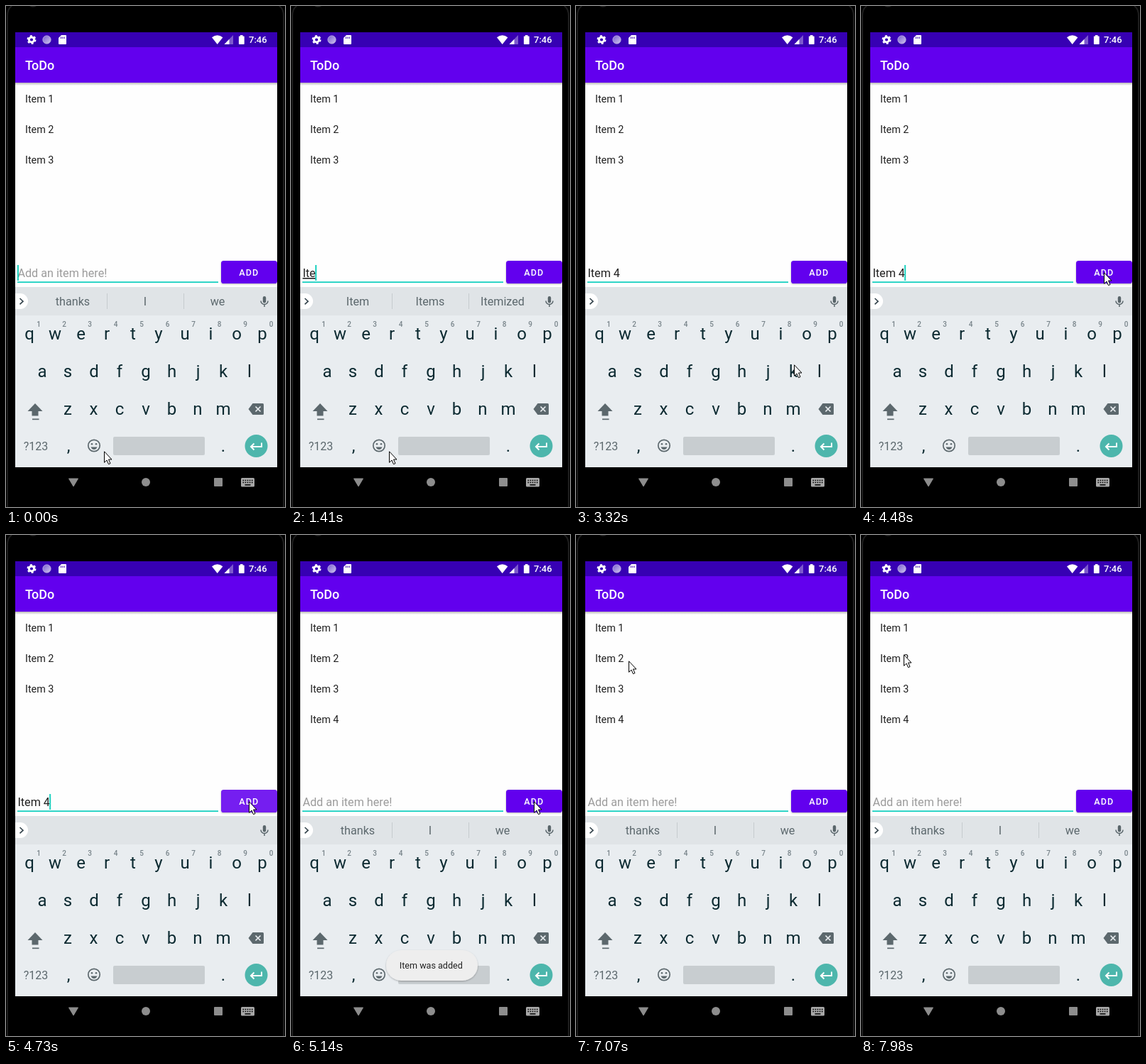
These frames come from a looping animation (393x706 px, 8000 ms). An HTML page:

```html
<!DOCTYPE html>
<html lang="en">
<head>
<meta charset="utf-8">
<title>ToDo</title>
<style>
html, body { margin: 0; width: 100%; height: 100%; overflow: hidden; background: #000; }
svg { display: block; width: 393px; height: 706px; font-family: Roboto, sans-serif; }
.mid { text-anchor: middle; }
.item { font-size: 14.37px; fill: #1f1f1f; }
.field { font-size: 16.16px; fill: #1f1f1f; }
.hint { fill: #9b9b9b; }
.typing { text-decoration: underline; }
.suggest { font-size: 16.16px; fill: #5c686d; text-anchor: middle; }
.keys { font-size: 24px; fill: #0c2a31; text-anchor: middle; }
.digits { font-size: 10px; font-weight: 500; fill: #78848a; text-anchor: middle; }

/* every change is a hard step on one shared 8 s clock */
.anim { animation: 8s step-end -2ms infinite; }
.off { opacity: 0; }

#idle { animation-name: idle; }
#w1 { animation-name: w1; }
#w2 { animation-name: w2; }
#w3 { animation-name: w3; }
#w4 { animation-name: w4; }
#w5 { animation-name: w5; }
#w6 { animation-name: w6; }
#next { animation-name: next; }
#added { animation-name: added; }
#press { animation-name: press; }
#toast { animation-name: toast; }
#caret { animation-name: blink; }
#caretX { animation-name: caretX; }
#mouse { animation-name: mouse; }

@keyframes idle { 0% { opacity: 1 } 13.875% { opacity: 0 } 59.375% { opacity: 1 } }
@keyframes w1 { 13.875% { opacity: 1 } 15.75% { opacity: 0 } }
@keyframes w2 { 15.75% { opacity: 1 } 17.625% { opacity: 0 } }
@keyframes w3 { 17.625% { opacity: 1 } 19.5% { opacity: 0 } }
@keyframes w4 { 19.5% { opacity: 1 } 21.375% { opacity: 0 } }
@keyframes w5 { 21.375% { opacity: 1 } 29.5% { opacity: 0 } }
@keyframes w6 { 29.5% { opacity: 1 } 59.375% { opacity: 0 } }
@keyframes next { 21.375% { opacity: 1 } 31% { opacity: 0 } }
@keyframes added { 59.375%, 100% { opacity: 1 } }
@keyframes press {
  57.5% { opacity: .12 } 59.375% { opacity: .22 } 60.875% { opacity: .15 }
  62.625% { opacity: .07 } 64.25% { opacity: 0 }
}
@keyframes toast {
  60.875% { opacity: .4 } 62.625% { opacity: .8 } 64.25% { opacity: 1 }
  86.75% { opacity: .5 } 88.375% { opacity: 0 }
}
@keyframes blink {
  0%, 10.375%, 43.375%, 56%, 69.125%, 83.25%, 94.75% { opacity: 1 }
  5%, 37.75%, 50.625%, 64.25%, 76%, 88.375%, 99.75% { opacity: 0 }
}
@keyframes caretX {
  0%, 59.375% { transform: translateX(0) }
  13.875% { transform: translateX(4.4px) }
  15.75% { transform: translateX(9.7px) }
  17.625% { transform: translateX(18.2px) }
  19.5% { transform: translateX(32.4px) }
  21.375% { transform: translateX(36.4px) }
  29.5% { transform: translateX(45.2px) }
}
@keyframes mouse {
  0% { transform: translate(138px, 627px) }
  37.75% { transform: translate(160px, 612px) }
  39.625% { transform: translate(236px, 560px) }
  41.5% { transform: translate(307px, 505px) }
  43.375% { transform: translate(348px, 455px) }
  45.25% { transform: translate(370px, 418px) }
  47.125% { transform: translate(371px, 398px) }
  48.75% { transform: translate(361px, 388px) }
  50.625% { transform: translate(353px, 383px) }
  52.5% { transform: translate(342px, 375px) }
  69.125% { transform: translate(325px, 363px) }
  70.875% { transform: translate(278px, 345px) }
  72.625% { transform: translate(225px, 324px) }
  76% { transform: translate(180px, 284px) }
  77.875% { transform: translate(135px, 244px) }
  79.75% { transform: translate(104px, 214px) }
  81.75% { transform: translate(92px, 202px) }
  83.25% { transform: translate(85px, 193px) }
  85% { transform: translate(80px, 186px) }
  86.75% { transform: translate(76px, 180px) }
  88.375% { transform: translate(74px, 177px) }
  89.875% { transform: translate(66px, 172px) }
  91.375%, 100% { transform: translate(60px, 168px) }
}
</style>
</head>
<body>
<svg viewBox="0 0 393 706">
  <defs>
    <linearGradient id="fall" x2="0" y2="1">
      <stop stop-color="#000" stop-opacity=".28"/>
      <stop offset="1" stop-color="#000" stop-opacity="0"/>
    </linearGradient>
    <linearGradient id="spin" x2="1" y2="1">
      <stop stop-color="#7a5fd0"/>
      <stop offset="1" stop-color="#cfc5ee"/>
    </linearGradient>
    <filter id="soft" x="-10%" y="-20%" width="120%" height="150%">
      <feDropShadow dx="0" dy="1" stdDeviation="1.2" flood-opacity=".28"/>
    </filter>
  </defs>

  <!-- phone body -->
  <rect width="393" height="706" fill="#000"/>
  <path d="M2 706V14Q2 4 8 0M391 706V14Q391 4 385 0" fill="none" stroke="#1e1e1e" stroke-width="2"/>
  <path d="M33 0Q38 3 43 0" fill="#262626"/>

  <!-- app -->
  <rect x="13" y="37" width="369" height="613" fill="#fefefe"/>
  <rect x="13" y="108" width="369" height="4" fill="url(#fall)"/>
  <rect x="13" y="58" width="369" height="50" fill="#6200ee"/>
  <rect x="13" y="37" width="369" height="21" fill="#3700b3"/>
  <text x="27" y="90" font-size="17.96" font-weight="500" fill="#fff">ToDo</text>

  <!-- status icons -->
  <g fill="#fff">
    <circle cx="36" cy="47.5" r="3.6" fill="none" stroke="#fff" stroke-width="3"/>
    <circle cx="36" cy="47.5" r="5.5" fill="none" stroke="#fff" stroke-width="2" stroke-dasharray="2.9 2.86"/>
    <circle cx="57.5" cy="47.5" r="5.6" fill="url(#spin)" stroke="#bfb2e6"/>
    <path d="M78 41H84Q85 41 85 42V53Q85 54 84 54H75Q74 54 74 53V45Z"/>
    <path d="M77.5 43.5v2.5M79.8 43.5v2.5M82.1 43.5v2.5" stroke="#3700b3"/>
    <path d="M290 44.3Q297.7 38 305.4 44.3L297.7 54Z"/>
    <path d="M320 41V54H307.5Z" opacity=".35"/>
    <path d="M314.5 46.8V54H307.5Z"/>
    <path d="M330 41h3.5v1.4H335q.7 0 .7.7V53.3q0 .7-.7.7h-6.400q-.7 0-.7-.7V43.100q0-.7.7-.7H330Z"/>
    <text x="342" y="52" font-size="13" font-weight="500">7:46</text>
  </g>

  <!-- list -->
  <g class="item">
    <text x="27" y="135.500">Item 1</text>
    <text x="27" y="178.500">Item 2</text>
    <text x="27" y="221.500">Item 3</text>
    <text x="27" y="264.500" class="anim off" id="added">Item 4</text>
  </g>

  <!-- entry row -->
  <rect x="16" y="388.300" width="283" height="1.800" fill="#14cfc0"/>
  <rect x="303" y="359" width="79" height="32" rx="3.600" fill="#6200ee" filter="url(#soft)"/>
  <rect x="303" y="359" width="79" height="32" rx="3.600" fill="#fff" class="anim off" id="press"/>
  <text x="328.300" y="380" font-size="12.570" font-weight="500" letter-spacing="1.120" fill="#fff">ADD</text>

  <!-- keyboard -->
  <rect x="13" y="396" width="369" height="254" fill="#e9edf0"/>
  <rect x="13" y="396" width="369" height="40" fill="#e0e4e7"/>
  <path d="M13 405H20A11 11 0 0 1 20 427H13Z" fill="#fff"/>
  <path d="M19.500 412L24 416.200L19.500 420.400" fill="none" stroke="#37474f" stroke-width="1.700"/>
  <g stroke="#59656a" stroke-width="1.500" fill="none">
    <rect x="361.800" y="409" width="4.400" height="9.500" rx="2.200" fill="#59656a" stroke="none"/>
    <path d="M359 415.500A5 5 0 0 0 369 415.500M364 420.500V424"/>
  </g>

  <!-- field text with its suggestions -->
  <g class="anim" id="idle">
    <text x="16.400" y="382" class="field hint">Add an item here!</text>
    <g class="suggest"><text x="94" y="422">thanks</text><text x="196" y="422">I</text><text x="298" y="422">we</text></g>
    <path d="M142.500 405V427M250.500 405V427" stroke="#c6cbce"/>
  </g>
  <g class="anim off" id="w1">
    <text x="16.400" y="382" class="field typing">I</text>
    <g class="suggest"><text x="94" y="422">I'm</text><text x="196" y="422">I</text><text x="298" y="422">In</text></g>
    <path d="M142.500 405V427M250.500 405V427" stroke="#c6cbce"/>
  </g>
  <g class="anim off" id="w2">
    <text x="16.400" y="382" class="field typing">It</text>
    <g class="suggest"><text x="94" y="422">Its</text><text x="196" y="422">It</text><text x="298" y="422">It's</text></g>
    <path d="M142.500 405V427M250.500 405V427" stroke="#c6cbce"/>
  </g>
  <g class="anim off" id="w3">
    <text x="16.400" y="382" class="field typing">Ite</text>
    <g class="suggest"><text x="94" y="422">Item</text><text x="196" y="422">Items</text><text x="298" y="422">Itemized</text></g>
    <path d="M142.500 405V427M250.500 405V427" stroke="#c6cbce"/>
  </g>
  <g class="anim off" id="w4">
    <text x="16.400" y="382" class="field typing">Item</text>
    <g class="suggest"><text x="94" y="422">Item</text><text x="196" y="422">Items</text><text x="298" y="422">Itemized</text></g>
    <path d="M142.500 405V427M250.500 405V427" stroke="#c6cbce"/>
  </g>
  <text x="16.400" y="382" class="field anim off" id="w5">Item</text>
  <text x="16.400" y="382" class="field anim off" id="w6">Item 4</text>
  <g class="anim off" id="next">
    <g class="suggest"><text x="94" y="422">is</text><text x="196" y="422">in</text><text x="298" y="422">and</text></g>
    <path d="M142.500 405V427M250.500 405V427" stroke="#c6cbce"/>
  </g>
  <g class="anim" id="caretX">
    <rect x="16" y="365" width="1.800" height="22" fill="#03cdb9" class="anim" id="caret"/>
  </g>

  <!-- keys -->
  <text class="digits" y="452" x="46 82 118 154.500 191 227.500 264 300.500 337 373.500">1234567890</text>
  <g class="keys">
    <text y="470" x="33 69 105.500 142 179 215 252 288.500 325 361">qwertyuiop</text>
    <text y="523" x="51 87 124 160 197 233.500 270.500 306 343">asdfghjkl</text>
    <text y="576" x="87 123.500 160 197 233.500 270 306">zxcvbnm</text>
    <text y="628" x="88 306">,.</text>
  </g>
  <g fill="#5c686d">
    <path d="M41 560L51.500 571H45.500V577.500H36.500V571H30.500Z"/>
    <rect x="37" y="581.500" width="9.500" height="1.700"/>
    <path d="M347.500 560H361.500Q363 560 363 561.500V574.500Q363 576 361.500 576H347.500L341.500 568Z"/>
    <path d="M351.500 564.500L358.500 571.500M358.500 564.500L351.500 571.500" stroke="#e9edf0" stroke-width="1.700"/>
    <text class="mid" x="42" y="625.500" font-size="16">?123</text>
    <circle cx="124" cy="619.500" r="8.200" fill="none" stroke="#5c686d" stroke-width="1.700"/>
    <circle cx="121" cy="617.300" r="1.300"/>
    <circle cx="127" cy="617.300" r="1.300"/>
    <path d="M119.500 621.500H128.500Q127 625 124 625T119.500 621.500Z"/>
  </g>
  <rect x="151" y="607" width="129" height="26" rx="2" fill="#c8cdd0"/>
  <circle cx="352.500" cy="620" r="16" fill="#4db6ac"/>
  <path d="M360 615.500V621H345.500M349.500 616.500L345 621L349.500 625.500" fill="none" stroke="#fff" stroke-width="2"/>

  <!-- navigation bar -->
  <g fill="#8d8d8d">
    <path d="M88.500 666H101.500L95 677Z" stroke="#8d8d8d" stroke-linejoin="round"/>
    <circle cx="197" cy="671" r="6"/>
    <rect x="293" y="665" width="12" height="12" rx="1"/>
    <rect x="331" y="665" width="19" height="12.500" rx="1.500" fill="#a8a8a8"/>
    <path d="M333.500 668.500H348M333.500 671.500H348" stroke="#000" stroke-width="1.600" stroke-dasharray="1.600 1.500"/>
    <path d="M336.500 674.800H344.500" stroke="#000" stroke-width="1.500"/>
  </g>

  <g class="anim off" id="toast">
    <rect x="134" y="585" width="129" height="43" rx="21.500" fill="#eee" filter="url(#soft)"/>
    <text class="mid" x="197.300" y="611" font-size="12.570" fill="#222">Item was added</text>
  </g>

  <g class="anim" id="mouse">
    <path d="M.5 .8V16.300L4 13L6.500 18.700L9 17.600L6.500 12H11Z" fill="#fff" stroke="#000"/>
  </g>
</svg>
</body>
</html>
```
